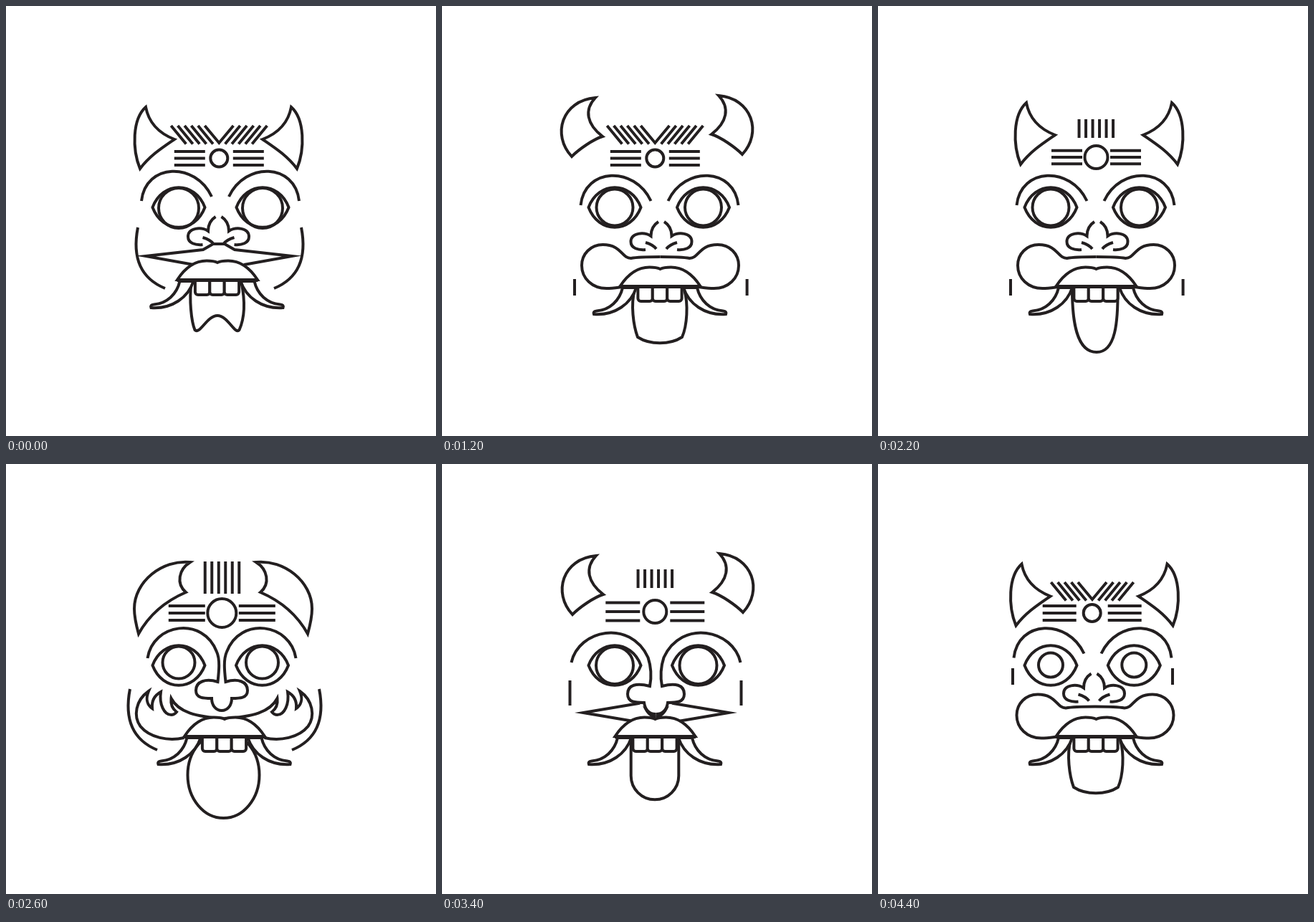
Recreate the animation shown at these times as an HTML page with a canvas. Size 600 by 600 pixels, loop 4.6 s.

```html
<!DOCTYPE html>
<html lang="en">
<head>
<meta charset="utf-8">
<title>Masks</title>
<style>
html, body { margin: 0; width: 100%; height: 100%; overflow: hidden; background: #fff; }
canvas { display: block; width: 600px; height: 600px; }
</style>
</head>
<body>
<canvas id="stage" width="600" height="600"></canvas>
<script>
const ctx = document.getElementById('stage').getContext('2d');
const INK = '#231f20';
const STEP = 200;

// Left halves, measured from the axis of the face; the right half is mirrored.
const HORN = {
  tall: 'M-101.5 141C-120.5 158 -120.5 200 -109.5 227C-96 209 -79 198 -61.5 186C-82 178 -97 165 -101.5 141Z',
  bull: 'M-46 115C-85 111 -124 142 -124 180C-124 193 -121 204 -118 215C-103 188 -80 169 -52 157C-66 145 -62 125 -46 115Z',
  cat: 'M-133 135L-75 166Q-100 180 -113 204Z',
  hook: 'M-86 128C-133 132 -147 180 -119 210C-109 200 -89 186 -76 182C-98 165 -102 145 -86 128Z'
};
const NOSE = {
  slim: 'M-103.5 271C-96 222 -26 212 -7 262C-2 273 -4 290 -5.5 304C-22 299 -36 303 -36 316C-36 327 -25 327 -14 327C-14 337 -8 344 0 344',
  wide: 'M-118 277C-108 231 -36 216 -11 270C-7 282 -6 297 -8.5 310C-27 305 -39.5 308 -39.5 321C-39.5 333 -28 333 -16.5 333C-15 343 -9 349 0 349',
  open: 'M-4 294C-12 299 -14.5 306 -14.5 314C-24 308 -42.5 309 -42.5 322C-42.5 331 -32 334 -22 333M-22 323C-15 325 -10 328 -7 332'
};
const BROW = 'M-110 272C-104 219 -35 217 -12 266';
const BEARD = {
  spike: 'M-35 361L-102 349L-22 340L-8 332H0',
  dart: 'M-31 359L-101.5 347L-18 333C-14 345 -8 352 0 353',
  curl: 'M-20 354C-32 358 -36 369 -52 369C-85 369 -109 350 -108.5 312C-95 342 -73 351 -58 349C-40 347 -32 326 -14 335L0 343',
  leaf: 'M-30 360C-50 355 -75 354 -102 347.5C-70 341 -40 337 -12 347',
  bulb: 'M0 350C-15 350 -30 350 -41 352C-54 352 -54 333 -80 333C-97 333 -109.5 346 -109.5 362C-109.5 380 -95 394 -75 394C-62 394 -52 391 -40 391',
  flame: 'M-56 382C-78 387 -104 382 -117 366C-127 352 -124 330 -105.5 317C-110.5 329 -106.5 337 -100.5 341C-101.5 331 -97.5 323 -88.5 318C-91 335 -84 350 -74 350C-71 350 -68 348 -66.5 346C-73 341 -75 335 -74 327C-64 346 -40 353 0 355'
};
const TONGUE = {
  fork: 'M-36 4C-39 28 -36 58 -31 70C-24 77 -14 50 0.5 50C15 50 25 77 31 70C39 52 39 28 34 4',
  wide: 'M-35 5C-41 25 -37 55 -31 71C-14 82 14 82 31 71C38 55 40 25 34 5',
  round: 'M-33.3 2V55A33.3 33.3 0 0 0 33.3 55V2',
  taper: 'M-33 4C-33 49 -27 92 1 92C28 92 31 49 30.5 4',
  oval: 'M-51 54A50 60 0 0 0 49 54A50 60 0 0 0 -51 54Z'
};
const EYE = 'M-36.5 0C-22.5 -37 22.5 -37 36.5 0C22.5 37 -22.5 37 -36.5 0Z';
const CHEEK = 'M0 0C-7 36 -1 69 38 85';
const FANG = 'M-52 2C-56 20 -70 33 -88 34.5C-92 35 -93 36 -92 39C-62 41 -40 24 -33 2Z';
const LIP = 'M-56 0C-45 -17 -31 -26.5 -15 -26.5C-8 -26.5 -4 -26 0 -24C4 -26 8 -26.5 15 -26.5C31 -26.5 45 -17 56 0Z';

// Seven settings for each part.
const horns = [ // shape, axis, y
  ['tall', 296.5, 0], ['bull', 302, 0], ['cat', 304, 0], ['tall', 308.5, -6],
  ['bull', 303, 22], ['hook', 301, 0], ['tall', 302, -1.5]];
const hairs = [ // axis, top, strokes per side (0 = upright bars), bar length
  [297.3, 167, 6], [303, 141, 4], [310.5, 155, 5], [304.3, 158, 0, 26],
  [301.5, 136, 0, 45], [297.3, 147, 0, 26], [299, 165, 5]];
const marks = [ // x, y, radius, line start, line end, line gap
  [297.3, 212.5, 12, 19.5, 62.5, 9.5], [303, 202.5, 16, 19, 63, 10],
  [310.3, 213.7, 17.3, 25.5, 84.5, 9.5], [304.5, 211, 16, 19.5, 62.5, 9.3],
  [301.3, 208, 20, 23.5, 74.5, 10], [297.3, 206, 16, 21, 69, 12.5],
  [298.7, 208, 12, 22, 69, 10]];
const eyes = [ // right eye x, pupil radius, pupil y
  [358, 28, 282], [361.5, 4.5, 281], [374, 17, 281], [364.5, 25.5, 281],
  [357.5, 22.5, 277], [357.5, 26, 281], [357.3, 17, 280.5]];
const noses = [ // shape, axis, y, nose axis, nose y
  ['open', 299, 0, 296.5, 0], ['slim', 299.5, 0], ['wide', 308.5, 0],
  ['open', 303.5, 6, 306, 7], ['slim', 301, 0], ['wide', 298.5, 0],
  ['open', 299.5, -1.5, 301.5, -1.5]];
const beards = [ // shape, axis, y
  ['spike', 297, 0], ['curl', 299.5, 0], ['leaf', 310.5, 0], ['bulb', 304.5, 0],
  ['flame', 304.5, 0], ['dart', 298.5, 0], ['bulb', 303, -11.5]];
const mouths = [ // axis, lip line
  [294.5, 382], [299, 380], [310.5, 380], [304, 391], [304.5, 380], [297, 380], [304, 380]];
const tongues = ['fork', 'wide', 'round', 'taper', 'oval', 'round', 'wide'];
const cheeks = [ // axis, half width, top, bar length (0 = arc)
  [298, 114, 309, 0], [299, 133, 312, 0], [305.3, 114.7, 366, 23], [305.3, 120.3, 381, 23],
  [305, 132, 314, 0], [298, 119.5, 302, 35], [299.5, 111.5, 285, 23]];

// Digits: horns, hair, mark, eyes, nose, beard, mouth, tongue, cheeks;
// then shifts: horn x, horn y, cheek x, mouth y.
const faces = [
  ['000000000'],
  ['652222234', 0, 0, 5, 4],
  ['503066666', 0, -2],
  ['111111111'],
  ['425555520'],
  ['636641444'],
  ['500333363', -1],
  ['141111141', 0, 9, -2],
  ['222222222'],
  ['064006605'],
  ['325455541', 0, -8, -3],
  ['333333333'],
  ['052222200', 10, -10, 12],
  ['444444444'],
  ['310100041'],
  ['643566616', 0, -20],
  ['011644402', 4, -8],
  ['555555555'],
  ['606366640', 0, -15],
  ['454111141', 0, -14, -2],
  ['035055563'],
  ['220444405', -8, -2],
  ['666666666']
];

const cache = {};
const shape = d => cache[d] || (cache[d] = new Path2D(d));

function draw(d, x, y, fill, flip = 1) {
  ctx.save();
  ctx.translate(x, y);
  ctx.scale(flip, 1);
  if (fill) ctx.fill(shape(d));
  ctx.stroke(shape(d));
  ctx.restore();
}

function pair(d, x, y, fill) {
  draw(d, x, y, fill);
  draw(d, x, y, fill, -1);
}

function line(x1, y1, x2, y2) {
  ctx.beginPath();
  ctx.moveTo(x1, y1);
  ctx.lineTo(x2, y2);
  ctx.stroke();
}

function disc(x, y, r) {
  ctx.beginPath();
  ctx.arc(x, y, r, 0, Math.PI * 2);
  ctx.stroke();
}

function drawHair([x, y, n, len]) {
  if (!n) {
    for (let i = -2.5; i < 3; i++) line(x + i * 9.5, y, x + i * 9.5, y + len);
    return;
  }
  draw('M-20 0L0 24L20 0', x, y);
  for (let i = 1; i < n; i++) {
    const dx = i * 9.4;
    line(x - dx - 20, y, x - dx + 1, y + 25.5);
    line(x + dx + 20, y, x + dx - 1, y + 25.5);
  }
}

function drawMark([x, y, r, from, to, gap]) {
  disc(x, y, r);
  for (let i = -1; i < 2; i++) {
    for (const s of [-1, 1]) line(x + s * from, y + i * gap, x + s * to, y + i * gap);
  }
}

function drawCheeks([x, half, y, len], dx) {
  for (const s of [-1, 1]) {
    const px = x + dx + s * half;
    if (len) line(px, y, px, y + len);
    else draw(CHEEK, px, y, false, -s);
  }
}

function drawNose([kind, x, y, nx, ny]) {
  if (kind === 'open') {
    pair(BROW, x, y);
    pair(NOSE.open, nx, ny);
  } else {
    pair(NOSE[kind], x, y, true);
  }
}

function drawEyes([right, r, y]) {
  for (const x of [241, right]) {
    draw(EYE, x, 281, true);
    disc(x, y, r);
  }
}

function drawMouth([x, y], tongue) {
  draw(TONGUE[tongue], x, y, true);
  pair(FANG, x, y, true);
  for (let i = -1; i < 2; i++) {
    ctx.beginPath();
    ctx.roundRect(x + i * 20.4 - 10.2, y, 20.4, 21, [0, 0, 4, 4]);
    ctx.fill();
    ctx.stroke();
  }
  draw(LIP, x + 0.5, y, true);
  ctx.lineWidth = 5;
  line(x - 56, y + 0.5, x + 57, y + 0.5);
  ctx.lineWidth = 4;
}

function drawFace([code, hornX = 0, hornY = 0, cheekX = 0, mouthY = 0]) {
  const [h, a, m, e, n, b, o, t, c] = code;
  const [horn, hx, hy] = horns[h];
  const [beard, bx, by] = beards[b];
  const [ox, oy] = mouths[o];

  ctx.fillStyle = '#fff';
  ctx.fillRect(0, 0, 600, 600);
  ctx.strokeStyle = INK;
  ctx.lineWidth = 4;

  draw(HORN[horn], hx + hornX, hy + hornY);
  draw(HORN[horn], hx + hornX, hy + hornY - (horn === 'hook' ? 3 : 0), false, -1);
  drawHair(hairs[a]);
  drawMark(marks[m]);
  drawCheeks(cheeks[c], cheekX);
  pair(BEARD[beard], bx, by);
  drawNose(noses[n]);
  drawEyes(eyes[e]);
  drawMouth([ox, oy + mouthY], tongues[t]);
}

function tick() {
  drawFace(faces[Math.floor(performance.now() / STEP) % faces.length]);
  requestAnimationFrame(tick);
}
tick();
</script>
</body>
</html>
```
